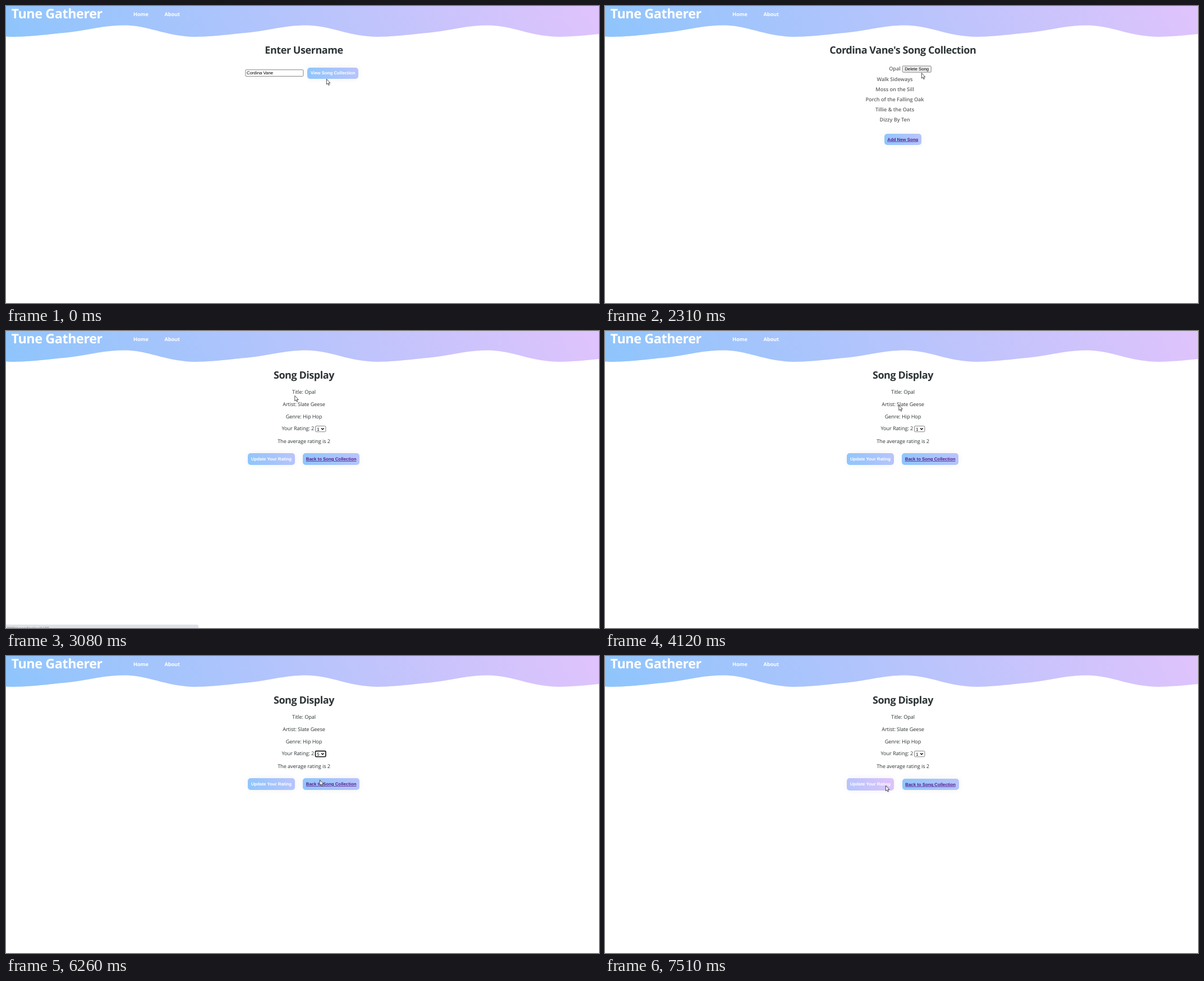
Write an HTML page that moves like this. It is 1057 px wide and 530 px high and loops after 8000 ms.

```html
<!DOCTYPE html>
<html lang="en">
<head>
<meta charset="utf-8">
<title>Tune Gatherer</title>
<style>
html, body { margin: 0; width: 100%; height: 100%; overflow: hidden; background: #fff; }
#stage { position: relative; width: 1057px; height: 530px; overflow: hidden; background: #fff; }
#stage > *, .page > * { position: absolute; }
.page, svg { left: 0; top: 0; width: 1057px; height: 530px; }
.page { visibility: hidden; }
#head { left: 0; top: 0; width: 1057px; height: 56px; background: linear-gradient(62deg, #8ec5fc, #e0c3fc); }
.btn { border-radius: 5px; background: linear-gradient(62deg, #8ec5fc, #e0c3fc) 0 0 / 200% 100%; box-shadow: 0 0 12px #f1f1f1; }
text { font-family: "Open Sans", "Noto Sans", sans-serif; fill: #2d3436; text-rendering: geometricPrecision; white-space: pre; }
.logo { font-size: 23.4px; font-weight: 700; letter-spacing: -.45px; fill: #fff; }
.nav { font-size: 9.2px; font-weight: 700; letter-spacing: -.1px; fill: #fff; }
.h { font-size: 18px; font-weight: 700; letter-spacing: -.45px; text-anchor: middle; }
.li { font-size: 9.2px; font-weight: 600; letter-spacing: -.05px; text-anchor: middle; fill: #636363; }
.p { font-size: 9.2px; letter-spacing: -.1px; }
.mid { text-anchor: middle; }
.ui { font: 7.8px "Liberation Sans", Arial, sans-serif; fill: #000; }
.b { font-weight: 700; fill: #fff; text-anchor: middle; }
.link { fill: #551a8b; text-decoration: underline; }
.box { fill: #fff; stroke: #767676; stroke-width: .9; }
#list { left: 551px; top: 180px; width: 18px; height: 49px; border: .6px solid #888; background: #fff; box-shadow: 0 4px 9px rgba(0,0,0,.2); }
#list svg { position: absolute; width: 18px; height: 49px; }
</style>
</head>
<body>
<div id="stage">
  <div id="head"></div>
  <svg>
    <path id="wave" fill="#fff"/>
    <text class="logo" x="9.5" y="22">Tune Gatherer</text>
    <text class="nav" x="227" y="18.2">Home</text>
    <text class="nav" x="282.5" y="18.2">About</text>
  </svg>

  <div class="page">
    <div class="btn" id="view"></div>
    <svg>
      <text class="h" x="531" y="84.8">Enter Username</text>
      <g id="field">
        <rect class="box" x="426.9" y="113.8" width="103" height="11.6" rx="1.2"/>
        <text class="ui" x="429" y="122.3">Cordina Vane</text>
      </g>
      <text class="ui b" x="582.6" y="122.4">View Song Collection</text>
    </svg>
  </div>

  <div class="page">
    <div class="btn" id="add"></div>
    <svg>
      <text class="h" x="530.8" y="84.8">Cordina Vane's Song Collection</text>
      <g id="songs"></g>
      <g id="del">
        <rect class="box" x=".4" y=".4" width="51.2" height="11.2" rx="1.4" style="fill:#efefef"/>
        <text class="ui mid" x="26" y="8.8">Delete Song</text>
      </g>
      <text class="ui b link" x="530.8" y="240.7">Add New Song</text>
    </svg>
  </div>

  <div class="page">
    <div class="btn" id="update"></div>
    <div class="btn" id="back"></div>
    <svg>
      <text class="h" x="531" y="84.8">Song Display</text>
      <g id="info">
        <text class="p mid" x="531" y="112.3">Title: Opal</text>
        <text class="p mid" x="531" y="134">Artist: Slate Geese</text>
        <text class="p mid" x="531" y="155.8">Genre: Hip Hop</text>
        <text class="p" x="491.5" y="177.4">Your Rating: 2</text>
        <rect class="box" id="select" x="551.5" y="169.6" width="18.4" height="10.2" rx="1.5"/>
        <text class="ui" id="value" x="554.3" y="177.5">1</text>
        <path d="M562 173.5l2.3 2.3l2.3-2.3" fill="none" stroke="#000" stroke-width="1.3"/>
        <text class="p mid" x="531" y="199.6">The average rating is 2</text>
        <text class="ui b" x="473" y="231.2">Update Your Rating</text>
        <text class="ui b link" id="backText" x="579.6" y="231.2">Back to Song Collection</text>
      </g>
    </svg>
    <div id="list"><svg id="options"><rect id="mark" width="18" height="9.7" fill="#1967d2"/></svg></div>
  </div>

  <svg>
    <g id="status">
      <path id="bar" fill="#dee1e6" stroke="#d3d6da" stroke-width=".6"/>
      <text x="1" y="533" style="font-size:7px;fill:#6b6f74">3000/songdisplay/1600</text>
    </g>
    <g id="cursor" stroke="#222" stroke-width=".8" fill="#fff" stroke-linejoin="round">
      <path id="arrow" d="M.4 .4V9.9L2.5 8L4.1 11.5L5.5 10.8L4 7.5H6.9Z"/>
      <path id="hand" transform="scale(1.07)" d="M-.9 1Q0-.3 .9 1V4.4Q2 3.8 2.6 4.8Q3.7 4.3 4.2 5.3Q5.5 5 5.7 6.3V8.6Q5.5 10 4.6 11.6H-.3L-2.9 7.4Q-3 6.1-1.7 6.5L-.9 7.4Z"/>
    </g>
  </svg>
</div>
<script>
const LOOP = 8000, ROW = 18.15, OPT = 9.7;
const SONGS = ["Opal", "Walk Sideways", "Moss on the Sill", "Porch of the Falling Oak", "Tillie & the Oats", "Dizzy By Ten"];

// cursor tip: time, x, y
const PATH = [
  [0, 571, 130], [80, 571, 130], [530, 574, 120], [1999, 574, 120], [2000, 573.5, 120],
  [2150, 573.5, 120], [2780, 514.5, 115], [3810, 514, 115], [4590, 541, 163], [4660, 541, 163],
  [5070, 565, 177], [5380, 565, 177], [6090, 559, 221], [6330, 559, 221], [7030, 500, 231]
];

const $ = id => document.getElementById(id);
const pages = [...document.querySelectorAll(".page")];
const clamp = v => Math.max(0, Math.min(1, v));
const ease = v => v * v * (3 - 2 * v);
const ramp = (t, a, b) => ease(clamp((t - a) / (b - a)));
const show = (id, on) => { $(id).style.display = on ? "" : "none"; };

function addText(parent, cls, x, y, str) {
  const el = document.createElementNS("http://www.w3.org/2000/svg", "text");
  el.setAttribute("class", cls);
  el.setAttribute("x", x);
  el.setAttribute("y", y);
  el.textContent = str;
  parent.append(el);
  return el;
}

function wavePath() {
  let d = "M-113 34.5";
  for (let p = -113; p < 1057; p += 324) {
    const v = p + 129;
    d += `C${p + 45} 34.5 ${p + 75} 55 ${v} 55`
      + `C${v + 25} 55 ${v + 66} 50.2 ${v + 100} 46.6`
      + `C${v + 135} 42 ${v + 160} 34.5 ${v + 195} 34.5`;
  }
  return d + "V58H-113Z";
}

// hover slides the gradient and grows the button slightly
function button(id, x, y, w, h, hover = 0, dx = 0, dy = 0) {
  const s = $(id).style, g = hover * .5;
  s.left = x - g + dx + "px";
  s.top = y - g + dy + "px";
  s.width = w + 2 * g + "px";
  s.height = h + 2 * g + "px";
  s.backgroundPosition = hover * 100 + "% 0";
}

function tip(t) {
  let i = 0;
  while (i < PATH.length - 1 && PATH[i + 1][0] <= t) i++;
  const a = PATH[i], b = PATH[i + 1] || a;
  const k = b === a ? 0 : ease((t - a[0]) / (b[0] - a[0]));
  return [a[1] + (b[1] - a[1]) * k, a[2] + (b[2] - a[2]) * k];
}

$("wave").setAttribute("d", wavePath());
const songs = SONGS.map((s, i) => addText($("songs"), "li", 516.5, 115.4 + i * ROW, s));
const options = [1, 2, 3, 4, 5].map((n, i) => addText($("options"), "ui", 3.3, 7.6 + i * OPT, n));

function render(t) {
  const [x, y] = tip(t);
  const page = t < 790 ? 0 : t < 2940 ? 1 : 2;
  pages.forEach((p, i) => { p.style.visibility = i === page ? "visible" : "hidden"; });

  const view = ramp(t, 150, 530);
  button("view", 537.2, 109.6, 90.8, 20.2, view);
  $("field").setAttribute("transform", `translate(${-view * .5} 0)`);

  button("add", 497.5, 227.8, 66.5, 20.2);
  const top = t >= 2220, link = t >= 2700 && t < 2940;
  show("del", t >= 1000);
  $("del").setAttribute("transform", top ? "translate(529.7 106.6)" : "translate(552 124.7)");
  songs[0].style.fill = link ? "#f4b9de" : "";

  const loaded = t >= 3000;
  const upd = ramp(t, 6760, 7260);
  const back = ramp(t, 6270, 6560) * (1 - ramp(t, 6640, 7060));
  ["info", "update", "back"].forEach(id => show(id, loaded));
  button("update", 431.2, 218.4, 83.8, 20.2, upd, -back * .5, upd * .5);
  button("back", 529.1, 218.4, 101.2, 20.2, back, upd * .6, upd * .6);
  $("backText").setAttribute("transform", `translate(${upd * .6} ${upd * .6})`);

  const open = t >= 5200 && t < 6260, focus = t >= 5150 && t < 7430;
  $("select").style.stroke = focus ? "#101010" : "";
  $("select").style.strokeWidth = focus ? 1.6 : "";
  $("value").textContent = t >= 6260 && t < 7510 ? 5 : 1;
  show("list", open);
  const pick = Math.max(0, Math.min(4, Math.floor((y - 180) / OPT)));
  $("mark").setAttribute("y", pick * OPT);
  options.forEach((o, i) => { o.style.fill = i === pick ? "#fff" : "#000"; });

  const w = t < 3000 ? 77.5 : 342.5;
  $("bar").setAttribute("d", `M-1 524.4H${w - 2}Q${w} 524.4 ${w} 526.4V532H-1Z`);
  $("status").setAttribute("opacity", t < 2700 ? 0 : 1 - clamp((t - 3250) / 150));

  $("cursor").setAttribute("transform", `translate(${x} ${y})`);
  show("arrow", !link);
  show("hand", link);
}

function tick() {
  render(performance.now() % LOOP);
  requestAnimationFrame(tick);
}
tick();
</script>
</body>
</html>
```
